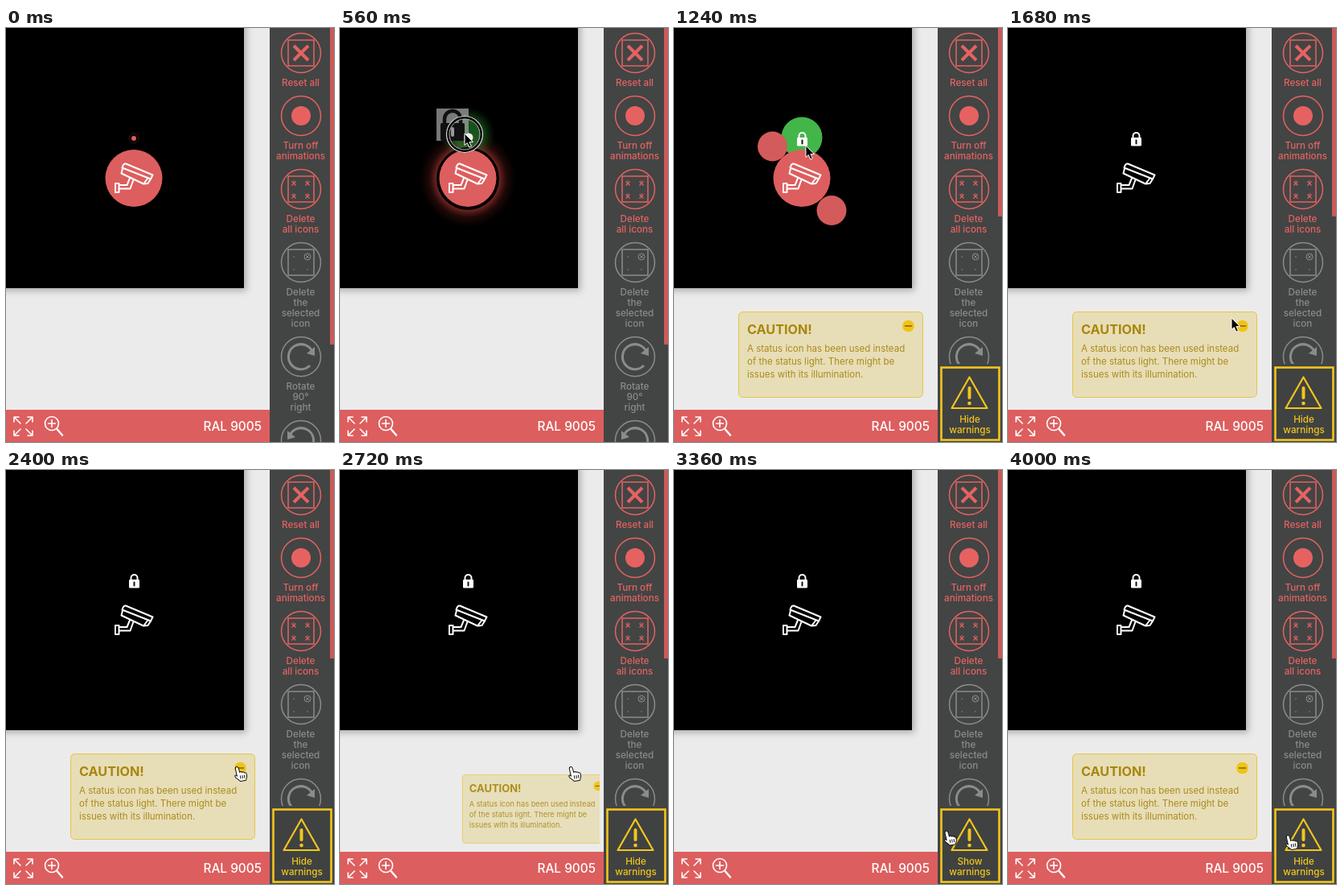
These frames come from a looping animation (408x514 px, 4600 ms). An HTML page:

```html
<!DOCTYPE html>
<html lang="en">
<head>
<meta charset="utf-8">
<title>Icon editor</title>
<style>
  html, body { margin: 0; height: 100%; overflow: hidden; background: #ebebeb; }
  svg { display: block; width: 100vw; height: 100vh; font-family: Inter, sans-serif; }
  .line { fill: none; stroke: currentColor; stroke-width: 1.5; }
  .label { font-size: 11.7px; font-weight: 500; text-anchor: middle; fill: currentColor; }
  .on { color: #e66261; }
  .off { color: #8a8c8b; }
  .white { fill: none; stroke: #fff; stroke-width: 2; stroke-linejoin: round; stroke-linecap: round; }
</style>
</head>
<body>
<svg viewBox="0 0 408 514">
  <defs>
    <clipPath id="toastClip"><rect width="323" height="474"/></clipPath>
    <clipPath id="menuClip"><rect id="menuRect" x="328" width="80" height="514"/></clipPath>
    <radialGradient id="redGlow">
      <stop offset=".62" stop-color="#c8403c" stop-opacity=".65"/>
      <stop offset=".8" stop-color="#a03028" stop-opacity=".2"/>
      <stop offset="1" stop-color="#802018" stop-opacity="0"/>
    </radialGradient>
    <radialGradient id="greenGlow">
      <stop offset=".5" stop-color="#23802b" stop-opacity=".65"/>
      <stop offset="1" stop-color="#104a14" stop-opacity="0"/>
    </radialGradient>
    <filter id="shadow" x="-10%" y="-10%" width="120%" height="120%">
      <feDropShadow dx="3" dy="3" stdDeviation="4" flood-opacity=".28"/>
    </filter>
  </defs>

  <rect width="408" height="514" fill="#ebebeb"/>
  <rect x="-20" y="-20" width="316" height="343" filter="url(#shadow)"/>

  <!-- canvas content -->
  <g id="light">
    <circle cx="159" cy="137" r="6" fill="none" stroke="#3a1717"/>
    <circle cx="159" cy="137" r="3" fill="#dd5e5e"/>
  </g>
  <g id="glow">
    <circle cx="159" cy="187" r="60" fill="url(#redGlow)"/>
    <circle cx="159" cy="132" r="34" fill="url(#greenGlow)"/>
    <circle cx="159" cy="187" r="39"/>
  </g>
  <circle id="green" cx="159" cy="136" fill="#43b649"/>
  <circle class="handle" cx="122.500" cy="147" fill="#d45b5b"/>
  <circle class="handle" cx="196" cy="226.500" fill="#d45b5b"/>
  <circle id="disc" cx="159" cy="186.500" r="35.500" fill="#dd5e5e"/>
  <g class="white">
    <path d="M149 168.500L182.500 182.500 180 187.500 144.500 173.500Q146 168 149 168.500Z"/>
    <path d="M145 174.500L143.500 180.500 171 193.500 176.500 186.500M171 193.500L176.500 193 180 187.500"/>
    <path d="M154 186.500L150.500 195H141M158.500 188.500L154.500 199.500H141M136 193h4.500v11h-4.500z"/>
  </g>
  <g id="lock">
    <rect x="153" y="136" width="13" height="10.500" rx="1.200" fill="#fff"/>
    <path class="white" d="M155.500 136V134A4 4 0 0 1 163.500 134V136"/>
    <path d="M159.500 139.500V143.500" stroke="#111" stroke-width="2" stroke-linecap="round"/>
  </g>

  <!-- footer -->
  <rect y="474" width="328" height="40" fill="#dd5e5e"/>
  <g class="white" style="stroke-width:1.600">
    <path d="M10 489V483H16M10 483L18 491M27 483H33V489M33 483L25 491M10 500V506H16M10 506L18 498M27 506H33V500M33 506L25 498"/>
    <circle cx="57" cy="491" r="8.500"/>
    <path d="M57 486.500V495.500M52.500 491H61.500"/>
    <path d="M63.500 498L70 505.500" stroke-width="2.500"/>
  </g>
  <text x="318" y="500" text-anchor="end" font-size="15.400" font-weight="500" fill="#fff">RAL 9005</text>

  <!-- warning message -->
  <g clip-path="url(#toastClip)">
    <g id="toast">
      <rect x="80.500" y="352.500" width="229" height="106" rx="5" fill="#e7deb7" stroke="#e6c443"/>
      <text x="91" y="380" font-size="16.200" font-weight="700" fill="#a8860c">CAUTION!</text>
      <g font-size="11.500" fill="#ab8a1c">
        <text x="91" y="402">A status icon has been used instead</text>
        <text x="91" y="418">of the status light. There might be</text>
        <text x="91" y="434">issues with its illumination.</text>
      </g>
      <circle cx="291.500" cy="370" r="7.300" fill="#f0c316"/>
      <path d="M287 370H296" stroke="#7d650c" stroke-width="1.500"/>
    </g>
  </g>

  <!-- side menu -->
  <rect x="328" width="80" height="514" fill="#424544"/>
  <g id="menu" clip-path="url(#menuClip)"></g>
  <rect id="thumb" x="403" width="5" fill="#c95b5a"/>
  <g id="warn" color="#f4c51c">
    <rect x="328" y="417" width="80" height="97" fill="#424544"/>
    <rect x="332.500" y="421.500" width="72" height="90" fill="#3f4241" stroke="currentColor" stroke-width="2.600"/>
    <g id="warnIcon">
      <path class="line" style="stroke-width:2.200" stroke-linejoin="round" d="M367.500 433.500L389.500 472H345.500Z"/>
      <path d="M367.500 447V459" stroke="currentColor" stroke-width="4" stroke-linecap="round"/>
      <circle cx="367.500" cy="466" r="2.300" fill="currentColor"/>
    </g>
    <text id="warnLabel" class="label" x="368" y="490"></text>
    <text class="label" x="368" y="503">warnings</text>
  </g>

  <!-- dragged icon and pointer -->
  <g id="pointer">
    <g id="ghost">
      <rect x="-35" y="-31" width="40" height="40" fill="#a0a0a0" opacity=".75"/>
      <path d="M-25-12V-18A10 10 0 0 1-5-18V-12" fill="none" stroke="#111" stroke-width="4.500"/>
      <rect x="-30" y="-13" width="30" height="22" rx="2" fill="#111"/>
      <path d="M-15-6V2" stroke="#999" stroke-width="4" stroke-linecap="round"/>
      <circle r="21" cy="1" fill="none" stroke="#000" stroke-width="4"/>
      <circle r="22.500" cy="1" fill="none" stroke="#ddd" stroke-width="1.200"/>
      <circle r="19" cy="1" fill="none" stroke="#bbb"/>
      <circle cx="5" cy="5" r="5.500" fill="#eee"/>
    </g>
    <path id="arrow" d="M0 0V14.500L3.300 11.600 5.800 17.200 8.400 16 6 10.600H10.500Z" stroke="#fff"/>
    <g id="hand" transform="rotate(-10)" stroke="#111" stroke-linejoin="round">
      <path fill="#fff" d="M-2 2Q-2-.5 0-.5T2 2L2.500 7Q4.500 5.500 5.500 7.500 7.500 6.500 8.200 8.500 10.500 8 10.500 10.500V13.500L8.500 18H1.500L-3.500 12.500Q-5 9.500-3 9.500L-1.500 11Z"/>
      <path fill="none" d="M2.500 11V15M5 11V15M7.500 11V15"/>
    </g>
  </g>
</svg>
<script>
const LOOP = 4600;
const $ = id => document.getElementById(id);
const handles = document.querySelectorAll('.handle');

// Menu icons are drawn around 0,0.
const square = '<path class="line" d="M-16-16H16V16H-16Z"/>';
const cross = (x, y, r, width) =>
  `<path class="line" style="stroke-width:${width}" d="M${x - r} ${y - r}l${2 * r} ${2 * r}m0 ${-2 * r}l${-2 * r} ${2 * r}"/>`;
const dot = (x, y, r) => `<circle cx="${x}" cy="${y}" r="${r}" fill="currentColor"/>`;
const turn = flip => `<g transform="scale(${flip} 1)">
  <path class="line" style="stroke-width:3" d="M11 11A15.500 15.500 0 1 1 14.500-5"/>
  <path fill="currentColor" d="M17-12V-1L7-4Z"/></g>`;
const corners = [[-9, -7], [8, -7], [-9, 9], [8, 9]];

const buttons = [
  [31, 'on', square + cross(0, 0, 9, 4), ['Reset all']],
  [109, 'on', dot(0, 0, 12), ['Turn off', 'animations']],
  [200, 'on', square + corners.map(([x, y]) => cross(x, y, 2.5, 1.2) + dot(x, y - 3, .8)).join(''),
    ['Delete', 'all icons']],
  [291, 'off', square + corners.map(([x, y]) => dot(x, y, .8)).join('') +
    '<circle class="line" style="stroke-width:1" cx="8" cy="-7" r="4"/>' + cross(8, -7, 2, 1),
    ['Delete', 'the', 'selected', 'icon']],
  [408, 'off', turn(1), ['Rotate', '90°', 'right']],
  [512, 'off', turn(-1), []]
];
$('menu').innerHTML = buttons.map(([y, state, icon, lines]) =>
  `<g class="${state}" transform="translate(367 ${y})">
    <circle class="line" r="24.500"/>${icon}
    ${lines.map((line, i) => `<text class="label" x="-.5" y="${41 + 13 * i}">${line}</text>`).join('')}
  </g>`).join('');

const progress = (t, from, to) => Math.min(1, Math.max(0, (t - from) / (to - from)));
const smooth = u => u * u * (3 - 2 * u);
const easeOut = u => 1 - (1 - u) ** 3;
const show = (id, visible) => $(id).setAttribute('display', visible ? 'inline' : 'none');
const fade = (node, opacity) => node.setAttribute('opacity', opacity);

// time, x, y of the pointer tip
const route = [
  [0, -30, 60], [520, 155, 131], [1160, 156, 131], [1680, 278, 360], [1720, 278, 360],
  [2040, 287, 369], [2940, 287, 369], [3380, 339, 449], [3480, 342, 451], [3640, 348, 454], [LOOP, 348, 454]
];
function pointerAt(t) {
  const i = route.findIndex(stop => stop[0] > t);
  const [from, x0, y0] = route[i - 1], [to, x1, y1] = route[i];
  const u = smooth(progress(t, from, to));
  return [x0 + (x1 - x0) * u, y0 + (y1 - y0) * u];
}

function toastScale(t) {
  if (t < 2400) return .3 + .7 * easeOut(progress(t, 800, 980));
  if (t < 3800) return 1 - .85 * progress(t, 2400, 2920) ** 3;
  return .3 + .7 * easeOut(progress(t, 3800, 4000));
}

function draw(t) {
  const dropped = t >= 640, warned = t >= 800;
  const hidden = t >= 2920 && t < 3800;
  const fill = 1 - smooth(progress(t, 1240, 1480));

  show('light', t < 520);
  fade($('glow'), smooth(progress(t, 40, 480)) * (1 - progress(t, 620, 800)));
  $('green').setAttribute('r', dropped ? 5 + 20.5 * easeOut(progress(t, 640, 880)) : 0);
  fade($('green'), fill);
  fade($('disc'), fill);
  for (const handle of handles) {
    handle.setAttribute('r', 18.5 * easeOut(progress(t, 760, 980)));
    fade(handle, fill);
  }
  fade($('lock'), progress(t, 1040, 1200));

  const scale = toastScale(t);
  show('toast', warned && !hidden);
  $('toast').setAttribute('transform', `translate(440 482) scale(${scale}) translate(-440 -482)`);
  fade($('toast'), Math.min(1, .4 + scale * .65));

  show('warn', warned);
  show('warnIcon', t >= 1080);
  $('warnLabel').textContent = hidden ? 'Show' : 'Hide';
  $('menuRect').setAttribute('height', warned ? 417 : 514);
  $('thumb').setAttribute('height', warned ? 234 : 393);

  const hand = dropped && t < 1240 || t >= 2200 && t < 2960 || t >= 3260;
  show('pointer', t >= 40);
  show('ghost', !dropped);
  show('hand', hand);
  show('arrow', !hand);
  $('pointer').setAttribute('transform', `translate(${pointerAt(t)})`);
}

const start = performance.now();
function tick() {
  draw((performance.now() - start) % LOOP);
  requestAnimationFrame(tick);
}
tick();
</script>
</body>
</html>
```
